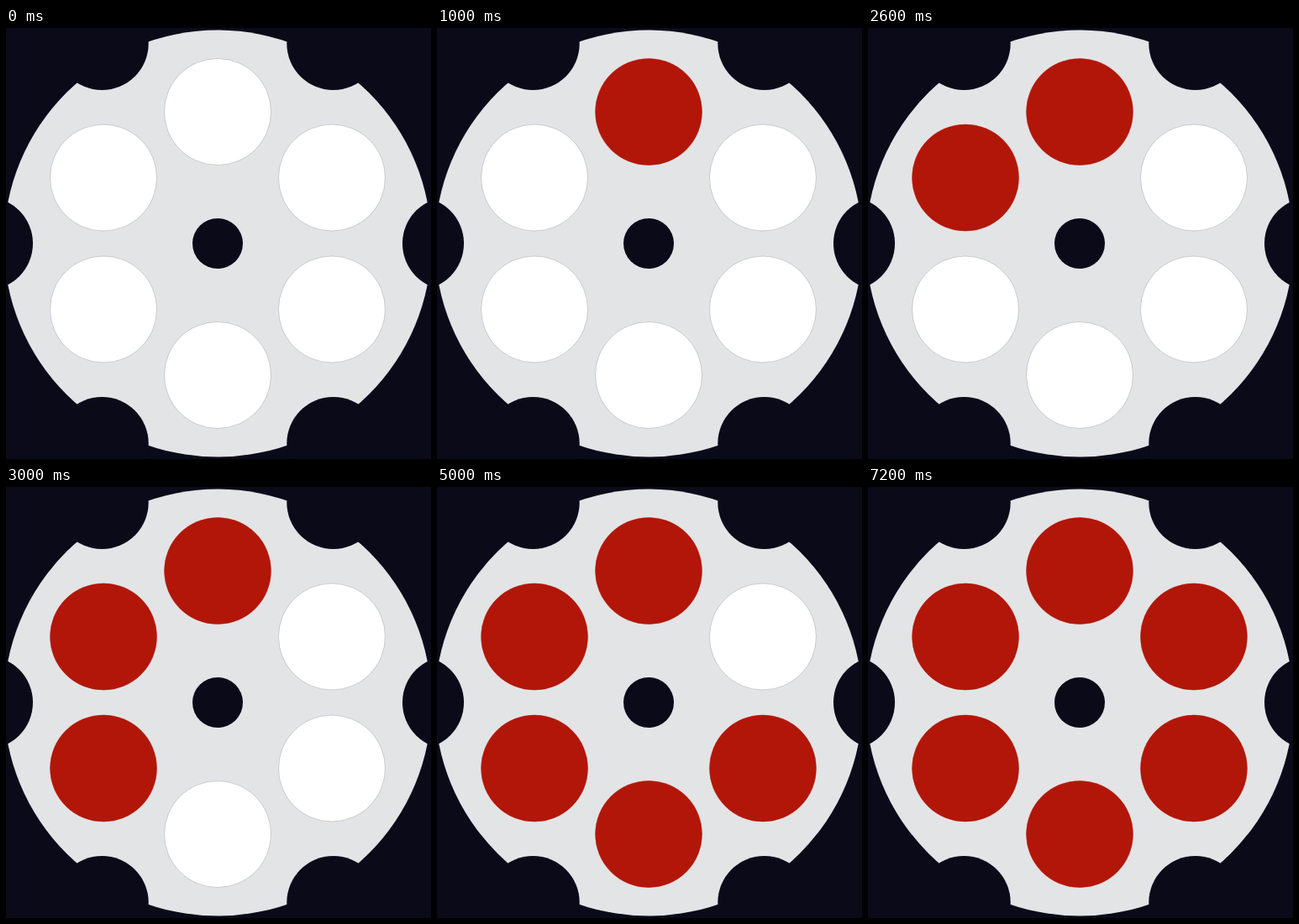
Write an HTML page that moves like this. It is 506 px wide and 514 px high and loops after 8000 ms.

```html
<!DOCTYPE html>
<html>
<head>
<meta charset="utf-8">
<style>
  html, body { margin: 0; width: 506px; height: 514px; overflow: hidden; background: #0b0a19; }
  svg { display: block; }
  .dark { fill: #0b0a19; }
  .chamber { fill: #fff; stroke: #a0a0a2; stroke-width: .5; }
  .chamber.full { fill: #b21609; stroke: #b21609; }
</style>
</head>
<body>
<svg width="506" height="514" viewBox="-252 -257 506 514">
  <circle r="254.5" fill="#e3e4e6"/>
  <circle r="30" class="dark"/>
</svg>
<script>
const svg = document.querySelector('svg');

function addCircle(distance, degrees, radius, className) {
  const angle = degrees * Math.PI / 180;
  const circle = document.createElementNS(svg.namespaceURI, 'circle');
  circle.setAttribute('cx', distance * Math.cos(angle));
  circle.setAttribute('cy', -distance * Math.sin(angle));
  circle.setAttribute('r', radius);
  circle.setAttribute('class', className);
  svg.append(circle);
  return circle;
}

// Chambers run counterclockwise from the top.
const chambers = [];
for (let i = 0; i < 6; i++) {
  addCircle(275.4, i * 60, 55.4, 'dark');
  chambers.push(addCircle(157, 90 + i * 60, 63.5, 'chamber'));
}

// One more chamber fills each second; the full wheel holds until the loop ends.
function draw() {
  const seconds = performance.now() % 8000 / 1000;
  chambers.forEach((chamber, i) => chamber.classList.toggle('full', seconds >= i + 1));
  requestAnimationFrame(draw);
}
draw();
</script>
</body>
</html>
```
